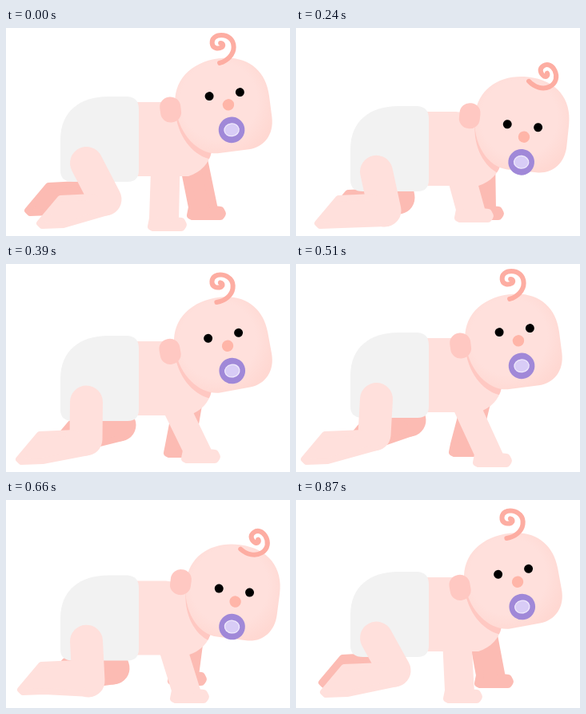
An HTML page with a canvas for the animation above (900 ms loop, 355x261 px).

```html
<!DOCTYPE html>
<html lang="en">
<head>
<meta charset="utf-8">
<title>Crawling baby</title>
<style>
  html, body { margin: 0; width: 100%; height: 100%; overflow: hidden; background: #fff; }
  canvas { display: block; }
</style>
</head>
<body>
<canvas id="stage" width="355" height="261"></canvas>
<script>
const ctx = document.getElementById('stage').getContext('2d');
const LOOP = 900, STEP = 30;
const SKIN = '#ffe0dc', FAR = '#fcbbb3', BLUSH = '#ffc8c2', HAIR = '#fdada2';

// Poses of each part at these times; smooth cyclic curves run through them.
const times = [0, 120, 240, 390, 510, 660, 870];
const tracks = {
  bob:      [0, 3, 12, 4, 0, 8.5, 4],
  headX:    [271, 277, 282, 270, 271, 283, 270],
  headY:    [97, 102, 120, 101, 97, 114.5, 101],
  tilt:     [-7.4, 1.5, 6, -10.4, -7.4, 7.4, -10.4],
  curl:     [0, 30, 64, 8, 0, 59, 8],
  kneeX:    [124, 120, 111, 100, 98, 103, 123],
  kneeY:    [215, 218, 229, 220, 214, 227, 214],
  footX:    [37, 32, 22, 11, 5, 13, 29],
  footY:    [252, 252, 252, 252, 252, 245, 248],
  farKneeX: [105, 108, 128, 142, 142, 134, 108],
  farKneeY: [208, 210, 213, 202, 196, 211, 206],
  farFootX: [22, 24, 34, 50, 55, 43, 27],
  farFootY: [236, 234, 245, 238, 236, 240, 236],
  handX:    [177, 180, 198, 219, 221, 205, 184],
  handY:    [255, 251, 244, 250, 255, 255, 255],
  farHandX: [226, 220, 211, 197, 191, 202, 223],
  farHandY: [241, 241, 241, 243, 242, 233, 236]
};

function sample(values, t) {
  const n = times.length;
  const wrap = i => (i + n) % n;
  const at = i => times[wrap(i)] + LOOP * Math.floor(i / n);
  const v = i => values[wrap(i)];
  const slope = i => (v(i + 1) - v(i - 1)) / (at(i + 1) - at(i - 1));
  let i = n - 1;
  while (times[i] > t) i--;
  const span = at(i + 1) - at(i), u = (t - at(i)) / span, w = 1 - u;
  return v(i) * w * w * (1 + 2 * u) + v(i + 1) * u * u * (3 - 2 * u)
    + span * u * w * (slope(i) * w - slope(i + 1) * u);
}

const torso = new Path2D('M160 93H200Q258 100 257 155Q252 178 228 186H160Z');
const diaper = new Path2D('M68 140C68 105 92 86 128 86H152Q166 87 166 102V178Q166 193 152 193H84Q68 193 68 179Z');
const head = new Path2D('M-59-5C-59-38-33-59 2-59C38-59 59-37 59-5V22C59 45 44 59 25 59H-12C-35 59-59 33-59-5Z');
const lock = new Path2D('M-1 0C9-3 16.5-11 16.5-20C16.5-30 9-35 1-35C-6-35-11-31-10.5-25C-10-18-3-17 2-20C4-22 3-25 0-25');

function fill(path, color) {
  ctx.fillStyle = color;
  ctx.fill(path);
}

function ellipse(x, y, rx, ry, color) {
  const path = new Path2D();
  path.ellipse(x, y, rx, ry, 0, 0, 7);
  fill(path, color);
}

function placed(x, y, degrees, draw) {
  ctx.save();
  ctx.translate(x, y);
  ctx.rotate(degrees * Math.PI / 180);
  draw();
  ctx.restore();
}

function line(path, color, width) {
  ctx.strokeStyle = color;
  ctx.lineWidth = width;
  ctx.lineCap = ctx.lineJoin = 'round';
  ctx.stroke(path);
}

// Polygon with rounded corners
function soft(points, color, round) {
  const path = new Path2D();
  points.forEach(([x, y]) => path.lineTo(x, y));
  path.closePath();
  fill(path, color);
  line(path, color, round);
}

function leg(hipX, hipY, kx, ky, fx, fy, color) {
  const thigh = new Path2D();
  thigh.moveTo(hipX, hipY);
  thigh.lineTo(kx, ky);
  line(thigh, color, 41);
  soft([[fx + 31, fy - 38], [fx + 5, fy - 7], [fx + 8, fy - 4], [fx + 35, fy - 5],
    [kx + 3, ky + 16], [kx - 14, fy - 40]], color, 8);
}

function arm(x, y, hx, hy, color) {
  soft([[x + 5, y], [hx + 7, hy - 16], [hx + 5, hy - 6], [hx + 7, hy - 5], [hx + 42, hy - 5],
    [hx + 44, hy - 8], [hx + 42, hy - 12], [hx + 34, hy - 13], [x + 31, y]], color, 10);
}

function drawHead(p) {
  const drop = p.headY - 97;
  const skin = ctx.createRadialGradient(-4, -6, 48, -4, -6, 72);
  skin.addColorStop(0, SKIN);
  skin.addColorStop(1, '#ffd8d2');
  fill(head, skin);

  const ear = new Path2D();
  ear.roundRect(-78.5, -19, 26, 32, 12.5);
  fill(ear, BLUSH);

  placed(4, -53, p.curl - p.tilt, () => line(lock, HAIR, 6));

  // The face slides down as the head drops
  ctx.translate(4 - drop * 0.1, -13.5 + drop * 0.7);
  ellipse(-19.3, 0, 5.5, 5.5, '#000');
  ellipse(19.3, 0, 5.5, 5.5, '#000');
  ellipse(3, 13.7, 7.2, 7.2, '#ffb5a8');
  ellipse(3, 45.5, 16.3, 16.3, '#a088d8');
  ellipse(3, 45.5, 9.8, 8.5, '#efe9fb');
  ellipse(3, 45.5, 8.5, 7.2, '#d8ccf6');
}

function draw(t) {
  const p = {};
  for (const name in tracks) p[name] = sample(tracks[name], t);
  ctx.fillStyle = '#fff';
  ctx.fillRect(0, 0, 355, 261);

  leg(122, 168 + p.bob, p.farKneeX, p.farKneeY, p.farFootX, p.farFootY, FAR);
  arm(213, 150 + p.bob, p.farHandX, p.farHandY, FAR);
  arm(182, 150 + p.bob, p.handX, p.handY, SKIN);

  ctx.save();
  ctx.translate(0, p.bob);
  fill(torso, SKIN);
  ctx.clip(torso);
  ctx.translate(0, -p.bob);
  placed(p.headX, p.headY + 8, p.tilt, () => fill(head, BLUSH));
  ctx.restore();

  placed(0, p.bob, 0, () => fill(diaper, '#f2f2f2'));
  leg(100.5, 169.5 + p.bob * 0.9, p.kneeX, p.kneeY, p.footX, p.footY, SKIN);
  placed(p.headX, p.headY, p.tilt, () => drawHead(p));
}

function tick() {
  let t = Math.floor(performance.now() % LOOP / STEP) * STEP;
  if (t === 30 || t === 270) t -= STEP; // brief holds at the top and bottom
  draw(t);
  requestAnimationFrame(tick);
}
tick();
</script>
</body>
</html>
```
